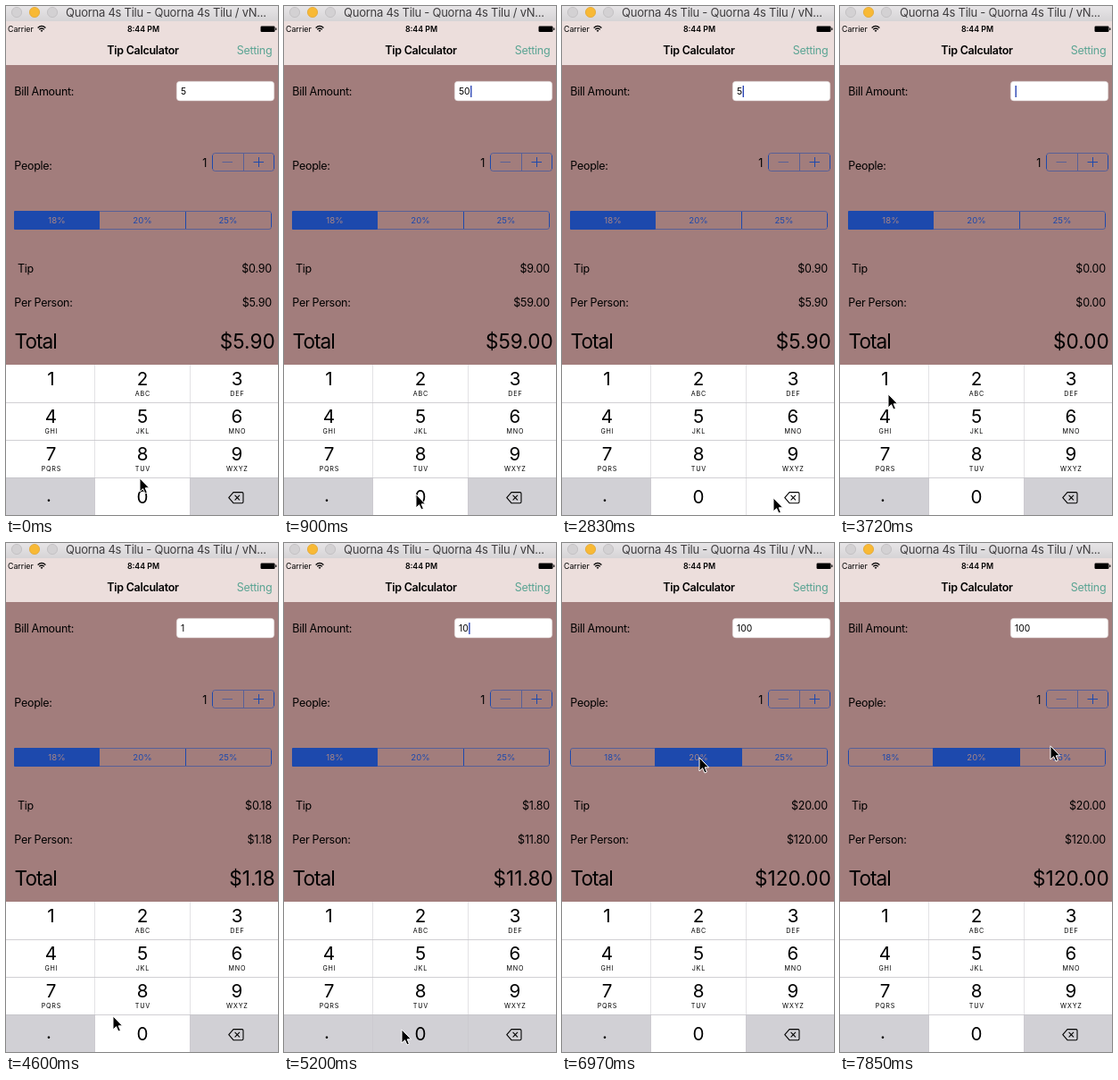
These frames come from a looping animation (305x569 px, 8 s). An HTML page:

```html
<!DOCTYPE html>
<html lang="en">
<head>
<meta charset="utf-8">
<title>Tip Calculator</title>
<style>
  html, body { margin: 0; width: 100%; height: 100%; overflow: hidden; background: #a27d7c; }
  svg { display: block; width: 305px; height: 569px; }
  text { font-family: Inter, Roboto, "Liberation Sans", sans-serif; fill: #000; white-space: pre; }
  .label { font-size: 12.5px; letter-spacing: -.29px; }
  .sum { font-size: 12.5px; letter-spacing: -.2px; }
  .big { font-size: 22.6px; }
  .mid { text-anchor: middle; }
  .end { text-anchor: end; }
  .digit { font-size: 20.6px; text-anchor: middle; }
  .letters { font-size: 7.2px; letter-spacing: .8px; text-anchor: middle; }
  .seg { font-size: 9.6px; text-anchor: middle; }
  .line { fill: none; stroke: #1d49ad; stroke-width: 1; }
  .faint { stroke-opacity: .55; }
</style>
</head>
<body>
<svg viewBox="0 0 305 569">
  <defs>
    <linearGradient id="bar" x2="0" y2="1">
      <stop offset="0" stop-color="#e7e5e7"/>
      <stop offset="1" stop-color="#d6d4d6"/>
    </linearGradient>
  </defs>
  <rect width="305" height="569" fill="#a27d7c"/>
  <rect width="305" height="66" fill="#ecdedc"/>

  <!-- window bar -->
  <rect width="305" height="17" fill="url(#bar)"/>
  <g stroke-width=".8">
    <circle cx="12" cy="7" r="5.6" fill="#d3d1d3" stroke="#bfbdbf"/>
    <circle cx="32" cy="7" r="5.6" fill="#f8b935" stroke="#e3a632"/>
    <circle cx="52" cy="7" r="5.6" fill="#d3d1d3" stroke="#bfbdbf"/>
  </g>
  <text x="67" y="12" font-size="13" letter-spacing="-.25" style="fill:#3e3c3e">Quorna 4s Tilu - Quorna 4s Tilu / vN...</text>

  <!-- status bar -->
  <text x="2" y="29" font-size="8.8">Carrier</text>
  <g fill="none" stroke="#000" stroke-width="1.3">
    <path d="M35.6 24.4Q40 20.4 44.4 24.4M37.2 26.3Q40 23.7 42.8 26.3"/>
    <path d="M38.6 27.4Q40 26.2 41.4 27.4L40 29Z" fill="#000" stroke="none"/>
  </g>
  <text class="mid" x="154" y="29" font-size="8.8" font-weight="600">8:44 PM</text>
  <rect x="285.5" y="22.5" width="16" height="6.5" rx="1.2"/>
  <rect x="302.2" y="24.3" width="1.2" height="2.8" rx=".6"/>

  <text class="label mid" x="153.5" y="54" font-weight="600">Tip Calculator</text>
  <text class="label end" x="298.3" y="54" style="fill:#5aa493">Setting</text>

  <!-- form -->
  <text class="label" x="9.3" y="100">Bill Amount:</text>
  <rect x="191.3" y="84.3" width="109.4" height="21.6" rx="3.6" fill="#fff" stroke="#d8cfce" stroke-width=".6"/>
  <text id="bill" x="196" y="99" font-size="10.3"></text>
  <rect id="caret" y="89" width="1.4" height="13" fill="#2b45b5"/>

  <text class="label" x="9.3" y="183">People:</text>
  <text class="label end" x="225" y="179.5">1</text>
  <rect class="line faint" x="231.5" y="164.5" width="69" height="20" rx="3"/>
  <path class="line faint" d="M266.5 165V184M242.5 174.5H254"/>
  <path class="line" d="M231.5 167V182M300.5 167V182M277.5 174.5H289M283.5 169V180"/>

  <rect id="chosen" y="229" height="21" rx="1"/>
  <rect class="line faint" x="9.5" y="229.5" width="288" height="20" rx="2.5"/>
  <path class="line" d="M9.5 232V247M104.5 230V249M201.5 230V249M297.5 232V247"/>
  <g id="segs"></g>

  <text class="label" x="13" y="298">Tip</text>
  <text class="sum end" id="tip" x="298" y="298"></text>
  <text class="label" x="9.3" y="336">Per Person:</text>
  <text class="sum end" id="each" x="298" y="336"></text>
  <text class="big" x="9.6" y="383" letter-spacing="-1">Total</text>
  <text class="big end" id="total" x="301.7" y="383"></text>

  <!-- keyboard -->
  <g id="pad"></g>
  <g fill="none" stroke="#000" stroke-width="1.1" stroke-linejoin="round">
    <path d="M249.8 549.7L255 543.6H264.5Q266 543.6 266 545.1V554.2Q266 555.7 264.5 555.7H255Z"/>
    <path d="M256.6 546.9L262 552.4M262 546.9L256.6 552.4"/>
  </g>

  <path id="arrow" d="M0 .8V16L3.6 12.7L6 18L8.4 17L6.2 11.8H10.6Z" fill="#000" stroke="#fff" stroke-width="1" stroke-linejoin="round"/>
</svg>
<script>
const LOOP = 8000, TICKS = 54;
const GREY = '#d1d0d5', WHITE = '#fff', BLUE = '#1d49ad';
const $ = id => document.getElementById(id);
const NS = 'http://www.w3.org/2000/svg';

function add(parent, tag, attrs, text) {
  const el = document.createElementNS(NS, tag);
  for (const k in attrs) el.setAttribute(k, attrs[k]);
  if (text) el.textContent = text;
  parent.appendChild(el);
  return el;
}

// keypad
const cols = [0, 100, 206, 305], mids = [50.5, 153, 259];
const groups = ['', 'ABC', 'DEF', 'GHI', 'JKL', 'MNO', 'PQRS', 'TUV', 'WXYZ'];
const pad = $('pad'), keys = {};
['1', '2', '3', '4', '5', '6', '7', '8', '9', '.', '0', 'del'].forEach((name, i) => {
  const c = i % 3, y = 401 + 42 * (i / 3 | 0);
  const idle = name === '.' || name === 'del' ? GREY : WHITE;
  const box = add(pad, 'rect', { x: cols[c], y, width: cols[c + 1] - cols[c], height: 42, fill: idle });
  keys[name] = { box, idle, down: idle === GREY ? WHITE : GREY };
  if (name === '.') add(pad, 'text', { class: 'digit', x: 48, y: y + 27 }, name);
  else if (name !== 'del') add(pad, 'text', { class: 'digit', x: mids[c], y: y + (i < 9 ? 23 : 29) }, name);
  if (groups[i]) add(pad, 'text', { class: 'letters', x: mids[c] + .4, y: y + 34.5 }, groups[i]);
});
add(pad, 'path', { d: 'M0 443.5H305M0 485.5H305M0 527.5H305', stroke: '#c6c5ca', 'stroke-width': .8 });
add(pad, 'path', { d: 'M99.5 401V569M206.5 401V569', stroke: '#c6c5ca', 'stroke-width': .5 });

// tip rates
const rates = [18, 20, 25], lefts = [9, 104, 201], rights = [105, 202, 298];
const segs = rates.map((r, i) => add($('segs'), 'text', { class: 'seg', x: [57, 153, 249][i], y: 243 }, r + '%'));
$('chosen').setAttribute('fill', BLUE);

// all times below are in ticks
const pointer = [
  [0, 150, 527], [1, 150, 533], [3, 148, 545], [13, 148, 545], [15, 237, 549], [23, 237, 549],
  [25, 54, 433], [26, 51, 425], [28, 51, 425], [31, 120, 528], [33, 132, 543], [37, 132, 543],
  [39, 148, 345], [41, 163, 260], [43, 166, 240], [44, 164, 240], [47, 154, 239], [53, 236, 226]
];
const bills = [[0, '5'], [5, '50'], [10, '500'], [17, '50'], [19, '5'], [21, ''], [27, '1'], [35, '10'], [37, '100']];
const presses = { 5: '0', 10: '0', 17: 'del', 19: 'del', 21: 'del', 27: '1', 35: '0', 37: '0' };
const caretOff = [[0, 1], [9, 10], [30, 33], [45, 48], [52, 54]];
const PICK = 44;

function place(k) {
  let i = pointer.length - 1;
  while (pointer[i][0] > k) i--;
  const a = pointer[i], b = pointer[i + 1] || a;
  const u = b === a ? 0 : (k - a[0]) / (b[0] - a[0]);
  return [1, 2].map(n => a[n] + (b[n] - a[n]) * u);
}

const money = v => '$' + v.toFixed(2);
let shown = -1;

function draw(k) {
  const bill = bills.filter(b => b[0] <= k).pop()[1];
  const pick = k >= PICK ? 1 : 0;
  const tip = bill * rates[pick] / 100, sum = +bill + tip;

  $('bill').textContent = bill;
  $('tip').textContent = money(tip);
  $('each').textContent = $('total').textContent = money(sum);

  const w = bill ? $('bill').getComputedTextLength() : 0;
  $('caret').setAttribute('x', 196.5 + w);
  $('caret').style.opacity = caretOff.some(([a, b]) => k >= a && k < b) ? 0 : 1;

  $('chosen').setAttribute('x', lefts[pick]);
  $('chosen').setAttribute('width', rights[pick] - lefts[pick]);
  segs.forEach((s, i) => s.style.fill = i === pick ? '#a98584' : BLUE);

  for (const name in keys) {
    const key = keys[name];
    key.box.setAttribute('fill', presses[k] === name ? key.down : key.idle);
  }
  $('arrow').setAttribute('transform', `translate(${place(k)})`);
}

function frame() {
  const t = performance.now() % LOOP;
  const k = Math.min(TICKS - 1, Math.floor((t + 10) / (LOOP / TICKS)));
  if (k !== shown) draw(shown = k);
  requestAnimationFrame(frame);
}
frame();
</script>
</body>
</html>
```
